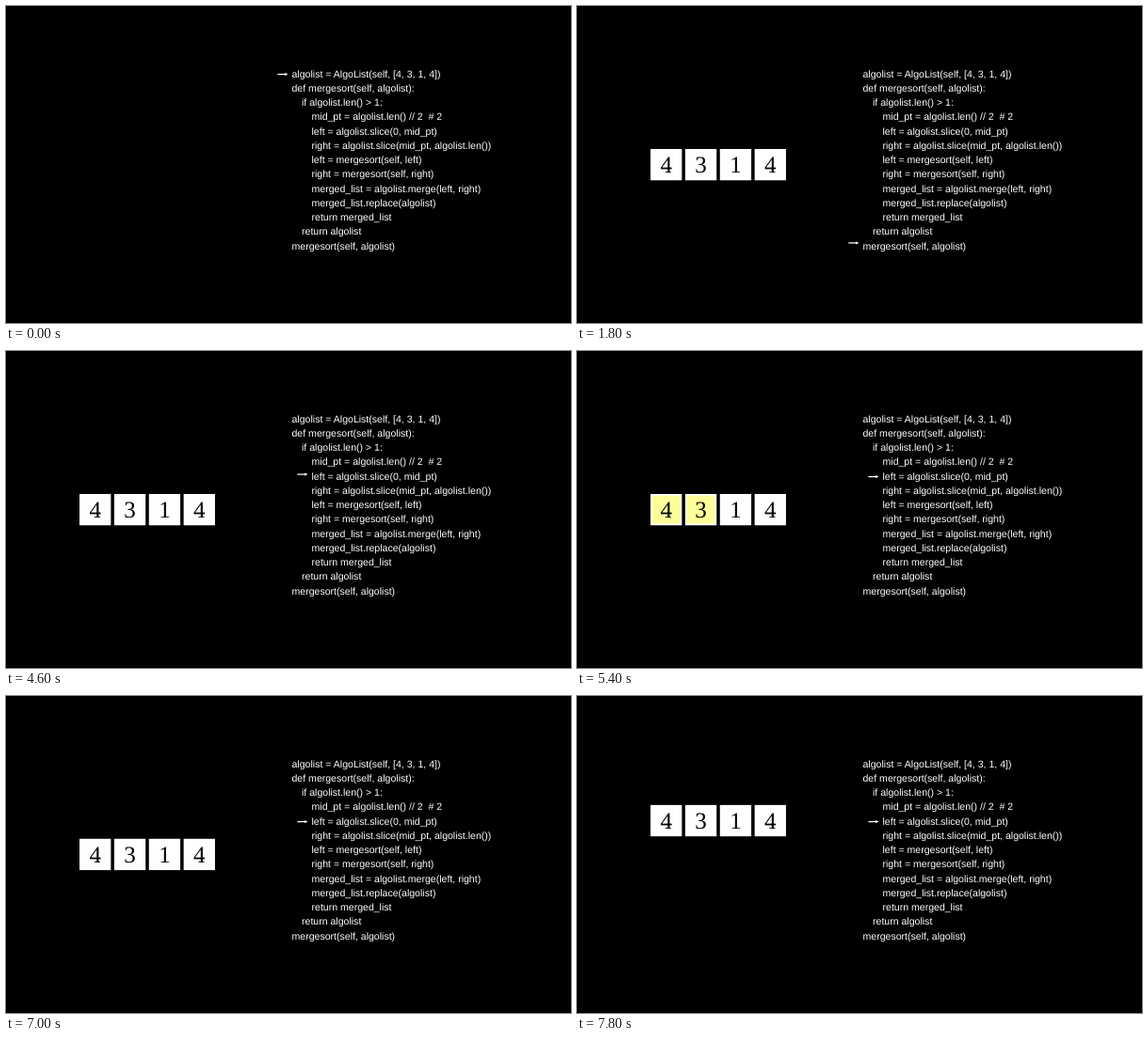
An HTML page for the animation above (8000 ms loop, 600 by 337 pixels).

```html
<!DOCTYPE html>
<html lang="en">
<head>
<meta charset="utf-8">
<title>Merge sort walkthrough</title>
<style>
  html, body { margin: 0; height: 100%; overflow: hidden; background: #000; }
  svg { display: block; width: 100%; height: 100%; }
  text { white-space: pre; text-rendering: geometricPrecision; }
  .code { font: 10.56px "Liberation Sans", Arial, sans-serif; fill: #fff; }
  .digit { font: 25px "Liberation Serif", serif; text-anchor: middle; }
  .box { stroke: #fff; stroke-width: 1.7; }
</style>
</head>
<body>
<svg id="stage" viewBox="0 0 600 337"></svg>
<script>
const LOOP = 8000, TICK = 200;      // the picture advances five times a second
const START = 940, STEP = 1000;     // back-to-back one-second moves
const LINE = 15.25, INDENT = 10.5;
const SIDE = 31.6, PITCH = 36.86;
const UNSNAP = "rotate(.01)";       // lets glyphs sit between pixel rows

const code = `algolist = AlgoList(self, [4, 3, 1, 4])
def mergesort(self, algolist):
 if algolist.len() > 1:
  mid_pt = algolist.len() // 2  # 2
  left = algolist.slice(0, mid_pt)
  right = algolist.slice(mid_pt, algolist.len())
  left = mergesort(self, left)
  right = mergesort(self, right)
  merged_list = algolist.merge(left, right)
  merged_list.replace(algolist)
  return merged_list
 return algolist
mergesort(self, algolist)`.split("\n");
const indentOf = line => code[line].search(/\S/);

const stage = document.getElementById("stage");
function add(parent, tag, attrs, text = "") {
  const node = document.createElementNS("http://www.w3.org/2000/svg", tag);
  for (const name in attrs) node.setAttribute(name, attrs[name]);
  node.textContent = text;
  return parent.appendChild(node);
}

code.forEach((text, line) => {
  const x = 303.5 + indentOf(line) * INDENT, y = 75.5 + line * LINE;
  add(stage, "text", { class: "code", transform: `translate(${x} ${y}) ${UNSNAP}` }, text.trim());
});

const arrow = add(stage, "path", { d: "M0-.55H7.8V-1.6L11 0L7.8 1.6V.55H0Z", fill: "#fff" });

const cells = add(stage, "g", {});
const boxes = [4, 3, 1, 4].map((value, i) => {
  const cell = add(cells, "g", { transform: `translate(${150 + (i - 1.5) * PITCH} 168.65)` });
  const box = add(cell, "rect", { class: "box", x: -SIDE / 2, y: -SIDE / 2, width: SIDE, height: SIDE });
  add(cell, "text", { class: "digit", transform: `translate(0 8.4) ${UNSNAP}` }, value);
  if (value === 4) add(cell, "path", { d: "M-.9 8H5.2", stroke: "#000", "stroke-width": .9 });
  return box;
});

// Sigmoid ease, rescaled to run exactly from 0 to 1
const sigmoid = x => 1 / (1 + Math.exp(-x));
function smooth(p) {
  const edge = sigmoid(-5);
  return (sigmoid(10 * (p - .5)) - edge) / (1 - 2 * edge);
}

const stops = [0, 12, 2, 3, 4];     // lines the arrow visits

function draw(time) {
  const progress = k => smooth(Math.min(1, Math.max(0, (time - START) / STEP - k)));

  let line = stops[0], indent = indentOf(line);
  for (let k = 1; k < stops.length; k++) {
    const p = progress(k - 1);
    line += (stops[k] - stops[k - 1]) * p;
    indent += (indentOf(stops[k]) - indentOf(stops[k - 1])) * p;
  }
  arrow.setAttribute("transform", `translate(${288.4 + indent * INDENT} ${72.6 + line * LINE})`);

  cells.setAttribute("visibility", time < START ? "hidden" : "visible");
  cells.setAttribute("transform", `translate(0 ${-PITCH * progress(6)})`);
  const highlight = progress(4) - progress(5);
  boxes.forEach((box, i) =>
    box.setAttribute("fill", `rgb(255 255 ${i < 2 ? Math.round(255 * (1 - highlight)) : 255})`));
}

function frame() {
  draw(Math.floor(performance.now() % LOOP / TICK) * TICK);
  requestAnimationFrame(frame);
}
frame();
</script>
</body>
</html>
```
